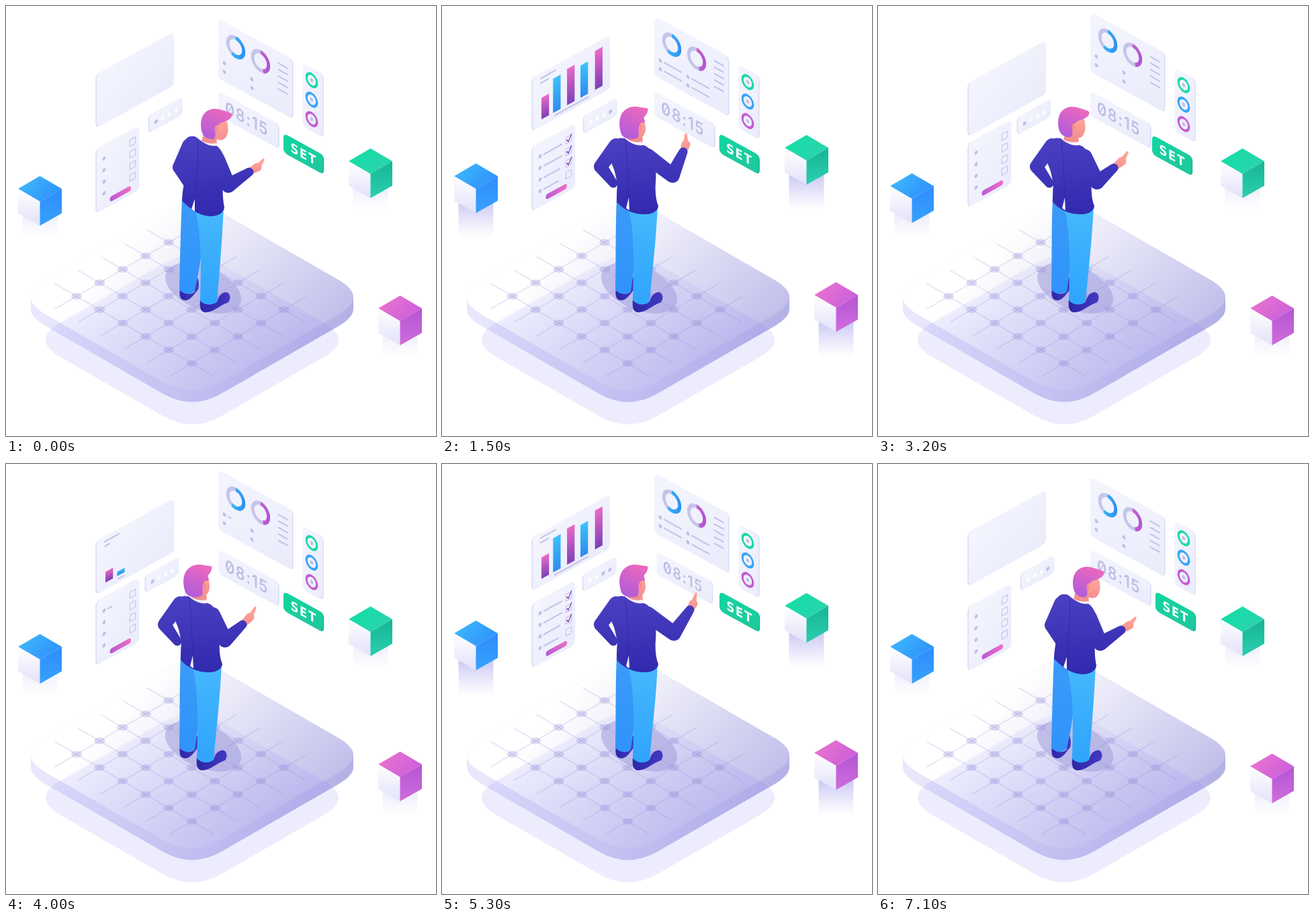
These frames come from a looping animation (640x640 px, 7.2 s). An HTML page:

```html
<!DOCTYPE html>
<html lang="en">
<head>
<meta charset="utf-8">
<title>Control room</title>
<style>
  html, body { margin: 0; width: 100%; height: 100%; overflow: hidden; background: #fff; }
  svg { display: block; width: 100%; height: 100%; }
  .clock { font-family: Inter, sans-serif; font-variant-numeric: slashed-zero; }
  .set { font-family: "DejaVu Sans", sans-serif; }
  .rule { stroke: #c5c5e9; stroke-width: 2.5; stroke-linecap: round; }
  .dot { fill: #bfbee8; }
  .box { fill: none; stroke: #c5c4ea; stroke-width: 1.3; }
  .tick { fill: none; stroke: #8f45c4; stroke-width: 1.8; }
  .grid { stroke: #8f8ad6; stroke-width: 1.5; opacity: .24; }
</style>
</head>
<body>
<svg id="stage" viewBox="0 0 640 640" xmlns="http://www.w3.org/2000/svg"></svg>
<script>
const LOOP = 7200, HALF = 3600, STEP = 100;
const stage = document.getElementById('stage');
const $ = id => document.getElementById(id);
const range = n => [...Array(n).keys()];
const clamp = v => Math.max(0, Math.min(1, v));
const sine = u => (1 - Math.cos(Math.PI * clamp(u))) / 2;
const cubic = u => (u = clamp(u)) < .5 ? 4 * u ** 3 : 1 - 4 * (1 - u) ** 3;

// ---- paints ----
const paint = id => `url(#${id}Paint)`;
const grad = (id, a, b, dir = [0, 0, 0, 1], user = false) =>
  `<linearGradient id="${id}Paint" x1="${dir[0]}" y1="${dir[1]}" x2="${dir[2]}" y2="${dir[3]}"
    ${user ? 'gradientUnits="userSpaceOnUse"' : ''}>
    <stop stop-color="${a}"/><stop offset="1" stop-color="${b}"/></linearGradient>`;

const defs = [
  grad('top', '#ffffff', '#b9b7e8', [190, 350, 435, 585], true),
  grad('side', '#e8e7fb', '#b3b0e6', [60, 440, 510, 510], true),
  grad('under', 'rgba(120,115,245,.07)', 'rgba(120,115,245,.135)', [277, 372, 277, 500], true),
  grad('card', '#f4f5fe', '#eaecfb', [0, 0, 1, 1]),
  grad('green', '#0fd69f', '#22c69e', [0, 0, 1, 1]),
  grad('pinkBar', '#ea69c6', '#7d40b8'),
  grad('blueBar', '#3cc2f8', '#2d8bf0'),
  grad('pill', '#b959d6', '#ec70c4', [0, 0, 1, 0]),
  grad('arc1', '#3cc5f5', '#2d92f5'),
  grad('arc2', '#ea69c6', '#b055d4'),
  grad('jacket', '#4b40c2', '#3029ae', [285, 195, 295, 312], true),
  grad('legBack', '#3a9bf8', '#2f93fb', [0, 290, 0, 430], true),
  grad('legFront', '#45b8fd', '#2fa4fc', [0, 300, 0, 445], true),
  grad('shoe', '#2c27a6', '#4338c2', [0, 0, 1, 0]),
  grad('hair', '#ec69bd', '#b05bdb', [.7, 0, .3, 1]),
  grad('skin', '#ffa799', '#f48e90'),
  grad('white', '#ffffff', '#e2e1fa')
].join('');

// ---- platform ----
// Rounded isometric square, optionally swept down by h.
function slab(cx, cy, w, h = 0) {
  const l = cx - w, r = cx + w, v = w * .577, b = cy + h, k = 25.4;
  return `M${l + 44},${cy - k} Q${l + 22},${cy - k / 2} ${l + 22},${cy} V${b}
    Q${l + 22},${b + k / 2} ${l + 44},${b + k} L${cx - 44},${b + v - k}
    Q${cx},${b + v} ${cx + 44},${b + v - k} L${r - 44},${b + k}
    Q${r - 22},${b + k / 2} ${r - 22},${b} V${cy} Q${r - 22},${cy - k / 2} ${r - 44},${cy - k}
    L${cx + 44},${cy - v + k} Q${cx},${cy - v} ${cx - 44},${cy - v + k}Z`;
}

const node = (i, j) => [105 + 34.3 * (i + j), 432 + 20 * (j - i)];
const gridLine = (a, b) => `<path class="grid" d="M${a} L${b}"/>`;

function platform() {
  const nodes = range(30).map(n => node(n % 5, Math.floor(n / 5)));
  return `<path d="${slab(277, 433.5, 262, 17.5)}" fill="${paint('side')}"/>
    <path d="${slab(277, 433.5, 262)}" fill="${paint('top')}"/>
    <path d="${slab(277, 497, 240)}" fill="${paint('under')}"/>` +
    range(5).map(i => gridLine(node(i, -.95), node(i, 5.95))).join('') +
    range(6).map(j => gridLine(node(-.95, j), node(4.95, j))).join('') +
    nodes.map(([x, y]) => `<ellipse cx="${x}" cy="${y}" rx="8" ry="5" fill="#8f8ad6" opacity=".3"/>`).join('') +
    '<ellipse cx="293.5" cy="420" rx="60" ry="32" transform="rotate(23 293.5 420)" fill="#9d99da" opacity=".5"/>';
}

// ---- cubes ----
const cubes = [
  { id: 'blue', x: 50.5, y: 253, start: 830, top: ['#3fbcfd', '#2f93fb'], right: ['#2f8cfd', '#36a2fd'] },
  { id: 'mint', x: 542.5, y: 212, start: 490, top: ['#0fe0a6', '#2bd3ac'], right: ['#16b594', '#2ccfae'] },
  { id: 'rose', x: 586.5, y: 431, start: 100, top: ['#ee76cd', '#cc60da'], right: ['#b555d5', '#cf6cdc'] }
];

const cube = c => `<defs>${grad(c.id + 'Top', ...c.top, [0, 0, 1, .5])}${grad(c.id + 'Right', ...c.right)}
    ${grad(c.id + 'Shade', 'rgb(206,204,244)', 'rgba(215,213,247,0)', [0, c.y + 42, 0, c.y + 92], true)}</defs>
  <rect id="${c.id}Shade" x="${c.x - 26}" width="52" fill="${paint(c.id + 'Shade')}"/>
  <g id="${c.id}">
    <path d="M0,0 32.5,19 0,38 -32.5,19Z" fill="${paint(c.id + 'Top')}"/>
    <path d="M-32.5,19 0,38V74L-32.5,55.5Z" fill="${paint('white')}"/>
    <path d="M32.5,19 0,38V74L32.5,55.5Z" fill="${paint(c.id + 'Right')}"/>
  </g>`;

// ---- wall panels ----
// side: -1 left wall, 1 right wall
const panel = (id, side, x, y, w, h, inner, fill = 'card', edge = '#dddef6') =>
  `<g id="${id}"><g transform="matrix(.866,${.476 * side},0,1,${x},${y})">
    <rect x="${2 * side}" width="${w}" height="${h}" rx="6" fill="${edge}"/>
    <rect width="${w}" height="${h}" rx="6" fill="${paint(fill)}"/>${inner}</g></g>`;

const dot = (x, y, r = 2.8) => `<circle class="dot" cx="${x}" cy="${y}" r="${r}"/>`;
const still = (x, y, len) => `<path class="rule" d="M${x},${y}h${len}"/>`;

// Lines that draw themselves in and out twice per loop.
const rules = [];
function rule(x, y, len, start, inDur, out, outDur) {
  rules.push({ x, len, start, inDur, out, outDur });
  return `<line class="rule" id="rule${rules.length - 1}" x1="${x}" y1="${y}" y2="${y}"/>`;
}

const barSizes = [32, 51, 54, 48, 58], barX = [15, 35, 59, 82, 107], BASE = 69;
const chart = rule(14, 7.5, 25, 0, 450, 1750, 700) + rule(14, 14.5, 13, 150, 450, 2150, 500) +
  rule(38, 74, 57, 250, 600, 2300, 600) +
  barX.map((x, i) => `<rect id="bar${i}" x="${x}" width="13" fill="${paint(i % 2 ? 'blueBar' : 'pinkBar')}"/>`).join('');

const ticks = [[1050, 1850], [700, 2350], [1200, 2500]];
const list = range(4).map(i => {
  const y = 20 + 17.3 * i;
  return dot(12.7, y) + rule(19.5, y, [30, 30, 27, 24][i], 250 + 150 * i, 500, 2300 + 100 * i, 500) +
    `<rect class="box" x="57" y="${y - 6.5}" width="9.6" height="9.6" rx="1"/>` +
    (i < 3 ? `<path class="tick" id="tick${i}" d="M58.5,${y - 2.5}l3,3.5 5.5,-9"/>` : '');
}).join('') + `<rect x="22.5" y="82" width="36.5" height="7.8" rx="3.9" fill="${paint('pill')}"/>`;

const loader = range(4).map(i =>
  `<circle cx="${11.5 + 11.3 * i}" cy="15" r="3" fill="#fff"/>
   <circle id="load${i}" cx="${11.5 + 11.3 * i}" cy="15" r="3" fill="#bfbee8"/>`).join('');

const donut = (x, y, share, colour) => {
  const ring = `cx="${x}" cy="${y}" r="13.6" fill="none" stroke-width="5.6"`;
  return `<circle ${ring} stroke="#c5c4ea"/>
    <circle ${ring} stroke="${paint(colour)}" pathLength="100" stroke-dasharray="${share} 100"
      transform="rotate(-90 ${x} ${y})"/>`;
};
const report = donut(30, 28, 58, 'arc1') + donut(72.7, 28.6, 45, 'arc2') +
  range(4).map(i => {
    const x = i < 2 ? 10.4 : 57.7, y = (i < 2 ? 61 : 62.5) + 13 * (i % 2);
    return dot(x, y) + rule(x + 7, y, 29, 280 + 150 * i, 500, 2300 + 100 * i, 500);
  }).join('') + range(5).map(i => still(103.5, 17 + 9.6 * i, 15)).join('');

const gauges = ['#17dba3', '#36a5f5', '#c65bd2'].map((c, i) =>
  `<circle cx="15.6" cy="${18 + 29 * i}" r="9" fill="none" stroke="${c}" stroke-width="3.6"/>` +
  dot(15.6, 18 + 29 * i, 2.7)).join('');

const clock = `<text class="clock" x="11.5" y="26.5" font-size="25" font-weight="600"
  letter-spacing="1.8" fill="#bfbee4">08:15</text>`;
const set = `<text class="set" x="12" y="21.3" font-size="19" font-weight="700"
  letter-spacing="2" fill="#fff">SET</text>`;

const walls = panel('chart', -1, 135, 102, 133, 79, chart) +
  panel('list', -1, 135, 213, 73, 95, list) +
  panel('loader', -1, 213.5, 162.5, 57, 26, loader) +
  panel('report', 1, 316, 19, 127, 88, report) +
  panel('gauges', 1, 441.5, 85, 34, 94, gauges) +
  panel('clock', 1, 316, 127, 103, 36, clock) +
  panel('set', 1, 413, 189.5, 67.5, 28.5, set, 'green', '#14b88e');

// ---- man: each shape has a standing and a second pose ----
const shapes = {
  legBack: [
    'M260,286C258,330 259,380 258,422C264,430 274,430 281,425C286,395 291,345 295,300Z',
    'M262,286C260,330 259,380 258,422C264,430 274,430 281,424C288,395 295,345 299,300Z'],
  legFront: [
    'M277,300C288,340 285,400 284,438C291,446 302,446 309,440C313,395 319,345 321,296Z',
    'M281,302C292,340 290,400 289,439C296,446 307,446 314,440C318,395 322,345 324,298Z'],
  torso: [
    'M272,197C264,195 257,198 253,204C251,215 250,225 253,236C258,246 259,256 261,266C260,275 260,285 260,292C272,304 284,310 303,310C312,310 321,306 322,298C318,288 317,275 318,262C319,250 318,235 316,224C311,214 306,209 300,207C290,209 280,204 272,197Z',
    'M283,195C275,192 268,195 265,203C262,212 258,225 258,238C262,246 264,256 265,264C263,275 262,283 262,290C276,304 288,312 304,313C314,313 324,309 325,300C323,290 322,278 323,264C325,250 327,235 325,226C322,217 318,211 313,208C303,210 292,203 283,195Z'],
  seam: ['M273,200C276,230 277,260 278,286', 'M286,200C286,230 284,260 281,288'],
  vent: ['M278,285L274,301L279,304Z', 'M281,287L276,302L281,306Z'],
  face: [
    'M289,172C297,166 302,168 302,175C304,182 303,188 300,193C296,197 290,196 288,194Z',
    'M289,172C297,164 308,166 308,173C309,181 309,188 304,194C298,199 291,196 288,192Z'],
  hair: [
    'M267,191C262,176 263,160 275,153C284,147 295,151 305,152C308,153 306,160 302,164C298,168 304,170 301,174C296,172 293,176 293,182C292,190 294,194 290,197C280,200 270,197 267,191Z',
    'M270,186C266,172 268,157 280,152C290,147 302,153 312,156C317,158 314,164 308,167C302,171 296,169 294,175C291,173 288,177 289,182C290,188 290,192 287,195C280,196 273,193 270,186Z'],
  ear: ['M294,177C298,175 299,183 295,186Z', 'M289,176C293,174 294,182 290,185Z']
};
const shape = (id, fill, extra = '') => `<path id="${id}" fill="${fill}" ${extra}/>`;

const man = `
  <path d="M259,421C257,432 260,439 268,438C276,437 280,428 286,422C288,415 287,405 283,403C279,412 280,420 281,425C274,431 264,429 259,421Z" fill="${paint('shoe')}"/>
  <path id="shoeFront" d="M284,436C283,449 284,456 293,456C305,455 312,446 326,441C331,434 328,426 322,426C316,427 312,430 309,440C302,446 290,445 284,436Z" fill="${paint('shoe')}"/>
  ${shape('legBack', paint('legBack'))}${shape('legFront', paint('legFront'))}
  ${shape('hand', paint('skin'))}${shape('arms', paint('jacket'))}
  <g id="neck"><path d="M279,188H298L299,206 275,203Z" fill="#f28f8d"/>
    <path d="M272,196Q284,205 298,202L301,209Q285,211 270,199Z" fill="#f3f3ff"/></g>
  ${shape('torso', paint('jacket'))}${shape('seam', 'none', 'stroke="#2c26a0" stroke-width="1" opacity=".6"')}
  ${shape('vent', '#f1f1ff')}
  <g id="head">${shape('face', paint('skin'))}${shape('hair', paint('hair'))}${shape('ear', '#f08a8c')}</g>`;

stage.innerHTML = `<defs>${defs}</defs>${platform()}${cubes.map(cube).join('')}${walls}${man}`;

// ---- motion ----
const mix = (a, b, u) => a + (b - a) * u;
const mixPath = ([a, b], u) => {
  const to = b.match(/[\d.]+/g);
  let i = 0;
  return a.replace(/[\d.]+/g, n => mix(+n, +to[i++], u).toFixed(1));
};

// Track rows: [time, value...], eased between rows.
function at(track, t) {
  const i = Math.max(1, track.findIndex(row => row[0] >= t));
  const a = track[i - 1], b = track[i];
  const u = sine((t - a[0]) / (b[0] - a[0]));
  return a.slice(1).map((v, k) => mix(v, b[k + 1], u));
}

const leanTrack = [[0, 1], [100, 1], [800, 0], [5700, 0], [6600, 1], [LOOP, 1]];
const turnTrack = [[0, 1], [100, 1], [800, 0], [2500, 0], [3100, 1], [3300, 1], [3900, 0], [5700, 0], [6600, 1], [LOOP, 1]];
const setTrack = [[0, 0], [1200, 0], [3000, 1], [3300, 1], [3900, 0], [LOOP, 0]];
const pressTrack = [[0, 1], [4900, 1], [5200, .92], [5400, .92], [5700, 1], [LOOP, 1]];

// shoulder, elbow, wrist, palm, fingertip
const rest = [314, 229, 331, 267, 362, 247, 374, 240, 383, 229];
const raised = [306, 224, 343, 252, 359, 217, 363, 206, 363, 191];
const lowered = [307, 225, 326, 262, 351, 241, 363, 231, 371, 218];
const aimed = [307, 225, 326, 262, 352, 239, 363, 228, 371, 214];
const push = [306, 224, 345, 252, 369, 217, 374, 208, 378, 193];
const armTrack = [[0, rest], [100, rest], [800, raised], [2400, raised], [3100, lowered], [3300, lowered],
  [3900, aimed], [4300, aimed], [5200, push], [5500, push], [6600, rest], [LOOP, rest]]
  .map(([t, pose]) => [t, ...pose]);

// Tapered capsule between two circles.
function limb(x1, y1, r1, x2, y2, r2) {
  const d = Math.hypot(x2 - x1, y2 - y1), nx = (y1 - y2) / d, ny = (x2 - x1) / d;
  return `M${x1 + nx * r1},${y1 + ny * r1}A${r1},${r1} 0 0 1 ${x1 - nx * r1},${y1 - ny * r1}
    L${x2 - nx * r2},${y2 - ny * r2}A${r2},${r2} 0 0 1 ${x2 + nx * r2},${y2 + ny * r2}Z`;
}

const attr = (id, name, value) => $(id).setAttribute(name, value);
const move = (id, x, y) => attr(id, 'transform', `translate(${x},${y})`);
const show = (t, start, inDur, out, outDur) => sine((t - start) / inDur) * (1 - sine((t - out) / outDur));

function drawMan(t) {
  const [lean] = at(leanTrack, t), [turn] = at(turnTrack, t);
  for (const id in shapes) {
    attr(id, 'd', mixPath(shapes[id], ['face', 'hair', 'ear'].includes(id) ? turn : lean));
  }
  move('head', 22 * lean, 3 * lean);
  move('neck', 15 * lean, 2 * lean);
  move('shoeFront', 5 * lean, 0);
  const [sx, sy, ex, ey, wx, wy, px, py, fx, fy] = at(armTrack, t);
  const lx = mix(236, 258, lean), ly = mix(239, 240, lean);
  attr('arms', 'd', limb(sx, sy, 12, ex, ey, 11) + limb(ex, ey, 11, wx, wy, 6.5) +
    limb(mix(259, 273, lean), 208, 11, lx, ly, 10) + limb(lx, ly, 10, mix(255, 270, lean), 264, 6.5));
  attr('hand', 'd', limb(wx, wy, 5, px, py, 6.5) + limb(px, py, 4, fx, fy, 1.8));
}

function drawWalls(t, h) {
  const s = (1 - Math.cos(2 * Math.PI * t / LOOP)) / 2;
  move('chart', 0, 13 * s);
  move('list', 0, -9 * s);
  move('loader', -5.5 * s, 3 * s);
  move('report', 0, -10 * s);
  move('gauges', 0, 7.5 * s);
  const [out] = at(setTrack, t), [k] = at(pressTrack, t);
  move('set', -5 * out, 2.3 * out);
  attr('clock', 'transform', `translate(361,170) scale(${k}) translate(-361,-170)`);

  rules.forEach((r, i) => {
    const g = show(h, r.start, r.inDur, r.out, r.outDur);
    attr('rule' + i, 'x2', r.x + r.len * g);
    attr('rule' + i, 'opacity', g > .01 ? 1 : 0);
  });
  barSizes.forEach((size, i) => {
    const len = size * show(h, 100 + 160 * i, 600, 1900 + 130 * i, 700);
    attr('bar' + i, 'y', BASE - len);
    attr('bar' + i, 'height', len);
  });
  ticks.forEach(([a, b], i) => attr('tick' + i, 'opacity', show(h, a, 150, b, 150)));
  const beat = t % 800;
  range(4).forEach(i => attr('load' + i, 'opacity', show(beat, 50 * i - 60, 60, 290 + 140 * i, 60)));
}

function drawCubes(h) {
  cubes.forEach(c => {
    const up = cubic((h - c.start) / 900) - cubic((h - c.start - HALF / 2) / 900);
    const y = c.y - 20 * up;
    move(c.id, c.x, y);
    attr(c.id + 'Shade', 'y', y + 50);
    attr(c.id + 'Shade', 'height', c.y + 42 - y);
    attr(c.id + 'Shade', 'opacity', mix(.5, 1, up));
  });
}

function frame() {
  const t = Math.floor(performance.now() % LOOP / STEP) * STEP;
  const h = t % HALF;
  drawWalls(t, h);
  drawCubes(h);
  drawMan(t);
  requestAnimationFrame(frame);
}
frame();
</script>
</body>
</html>
```
